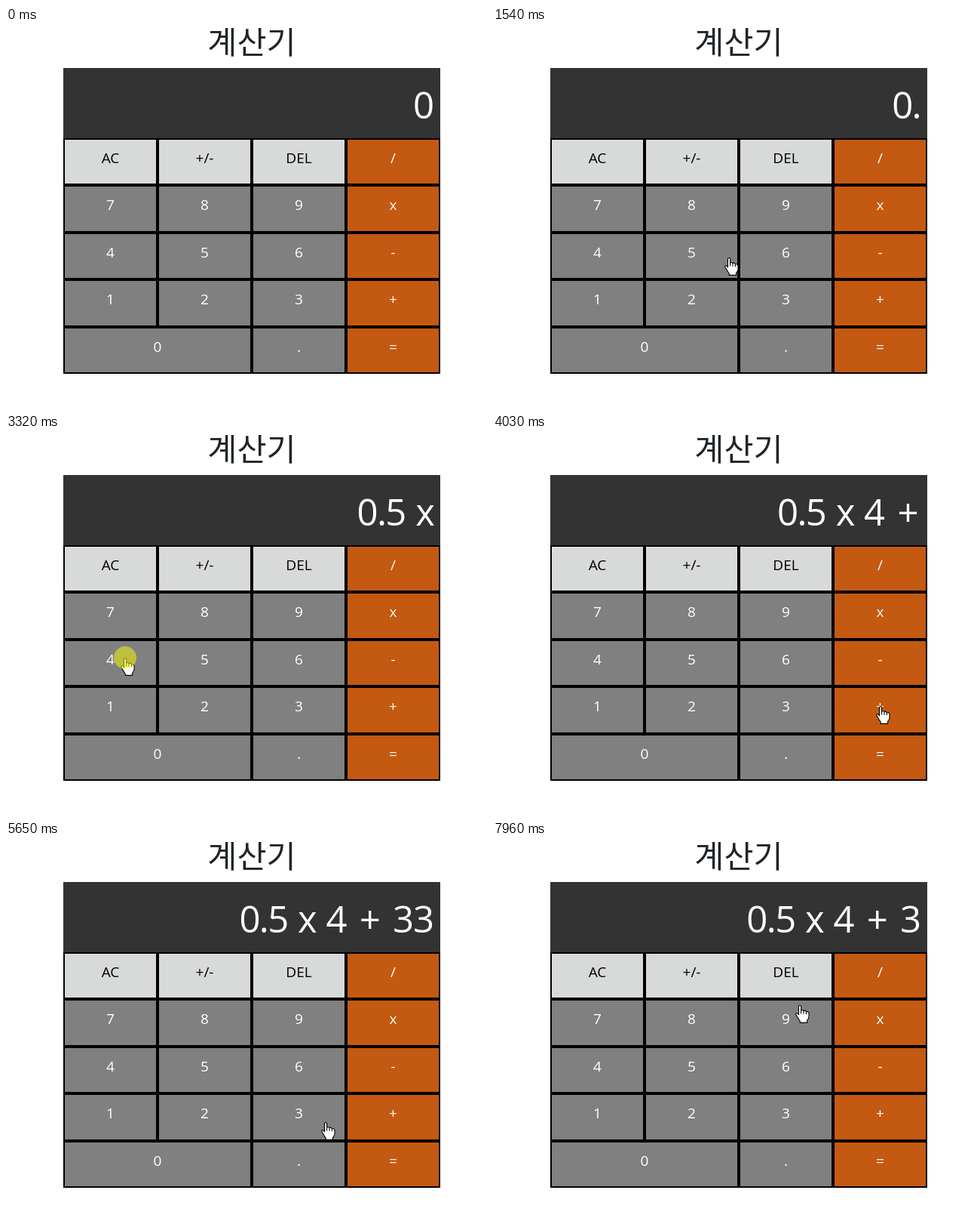
These frames come from a looping animation (638x502 px, 8 s). An HTML page with a canvas:

```html
<!DOCTYPE html>
<html lang="ko">
<head>
<meta charset="utf-8">
<title>계산기</title>
<style>
  html, body { margin: 0; width: 100%; height: 100%; overflow: hidden; background: #fff; }
  canvas { display: block; }
</style>
</head>
<body>
<canvas id="stage" width="638" height="502"></canvas>
<script>
const ctx = document.getElementById('stage').getContext('2d');
const LOOP = 8000, START = 292, TICK = 77.4;
const SANS = '"Open Sans", "Noto Sans", sans-serif';
const HANGUL = '"Noto Sans CJK KR", "Noto Sans CJK JP", "Noto Sans CJK", sans-serif';
const LEFT = 76, TOP = 146, CELL_W = 125, CELL_H = 62.5;

const ROWS = [
  ['AC', '+/-', 'DEL', '/'],
  ['7', '8', '9', 'x'],
  ['4', '5', '6', '-'],
  ['1', '2', '3', '+'],
  ['0', null, '.', '=']
];

// Places the pointer rests at; times in ticks, "via" bends the way there
const STOPS = [
  { at: [546, 482], arrive: 0, leave: 0 },
  { at: [392, 417], arrive: 9, leave: 12, via: [255, 365], key: '.', press: 10 },
  { at: [299, 302], arrive: 17, leave: 19, via: [360, 333], key: '5', press: 17 },
  { at: [494, 243], arrive: 22, leave: 30, key: 'x', press: 25 },
  { at: [158, 295], arrive: 38, leave: 40, via: [290, 345], key: '4', press: 38 },
  { at: [514, 359], arrive: 46, leave: 51, via: [380, 345], key: '+', press: 46 },
  { at: [407, 372], arrive: 57, leave: 60, via: [340, 366], key: '3', press: 59 },
  { at: [412, 376], arrive: 65, leave: 67, key: '3', press: 65 },
  { at: [424, 371], arrive: 69, leave: 72 },
  { at: [422, 190], arrive: 82, leave: 94, via: [511, 290], key: 'DEL', press: 85, hold: 1 },
  { at: [407, 216], arrive: 99, leave: 104, via: [407, 312] }
];
const CLICKS = STOPS.filter(s => s.key).map(({ key, press, hold = 2 }) =>
  ({ key, press, release: press + hold }));

const HAND = new Path2D(
  'M-1.5 1.6Q0-.6 1.6 1.6V7.2Q3.4 5.6 5 7.6Q6.9 6.4 8.4 8.7Q10.6 8 12 10.6' +
  'V15.5Q11.8 18 9.6 20.4V23.4H.2V21Q-2 18.5-3.2 15.8L-5.3 12.6Q-5 9.8-2.8 11.2L-1.5 12.8Z');
const KNUCKLES = new Path2D('M1.6 7V11.5M5 8V11.8M8.4 9V12.2');

function text(str, x, y, font, color) {
  ctx.font = font;
  ctx.fillStyle = color;
  ctx.fillText(str, x, y);
}

function cellColor(row, col) {
  if (col === 3) return '#c45911';
  return row === 0 ? '#d8dad9' : '#808080';
}

function drawKeys() {
  ctx.fillStyle = '#000';
  ctx.fillRect(LEFT, TOP, CELL_W * 4, 312);
  ROWS.forEach((row, r) => row.forEach((label, c) => {
    if (label === null) return;
    const w = label === '0' ? CELL_W * 2 : CELL_W;
    const x = LEFT + c * CELL_W;
    const y = Math.floor(TOP + r * CELL_H);
    const bottom = Math.floor(TOP + (r + 1) * CELL_H);
    const light = r === 0 && c < 3;
    ctx.fillStyle = cellColor(r, c);
    ctx.fillRect(x + 2, y + 2, w - 4, bottom - y - 4);
    text(label, x + w / 2, y + 33, `${light ? 400 : 500} 19px ${SANS}`, light ? '#000' : '#fff');
  }));
}

// What the display shows after one more key
function type(shown, key) {
  if (key === 'DEL') return shown.slice(0, -1);
  const spaced = 'x+'.includes(key) || /[x+]$/.test(shown);
  return shown + (spaced ? ' ' : '') + key;
}

// Character advance in em
function advance(ch) {
  return { '.': 0.217, ' ': 0.274, 'x': 0.459, '+': 0.684 }[ch] || 0.539;
}

function drawDisplay(shown) {
  ctx.fillStyle = '#323332';
  ctx.fillRect(LEFT, 53, CELL_W * 4, 93);
  let x = 567.5;
  for (const ch of [...shown].reverse()) {
    const w = advance(ch) * 50;
    text(ch, x - w / 2, 119.5, `49px ${SANS}`, '#fff');
    x -= w;
  }
}

function pointerAt(tick) {
  const next = STOPS.findIndex(s => s.leave >= tick);
  const to = STOPS[next];
  if (tick >= to.arrive) return to.at;
  const from = STOPS[next - 1];
  const u = (tick - from.leave) / (to.arrive - from.leave);
  const s = (1 - Math.cos(Math.PI * u)) / 2;
  return to.at.map((b, i) => {
    const a = from.at[i], mid = (a + b) / 2;
    const bend = to.via ? to.via[i] - mid : 0;
    return Math.round(a + (b - a) * s + 4 * s * (1 - s) * bend);
  });
}

function drawPointer([x, y], pressed) {
  ctx.save();
  ctx.translate(x, y);
  ctx.fillStyle = '#fff';
  ctx.strokeStyle = '#000';
  ctx.lineWidth = 1.1;
  ctx.lineJoin = 'round';
  ctx.fill(HAND);
  ctx.stroke(HAND);
  ctx.stroke(KNUCKLES);
  if (pressed) {
    ctx.fillStyle = 'rgba(255, 255, 0, 0.5)';
    ctx.beginPath();
    ctx.arc(0, 0, 15, 0, Math.PI * 2);
    ctx.fill();
  }
  ctx.restore();
}

function draw(t) {
  const tick = Math.floor((t - START) / TICK);
  ctx.fillStyle = '#fff';
  ctx.fillRect(0, 0, 638, 502);
  ctx.textAlign = 'center';
  text('계산기', 326, 34, `300 42.5px ${HANGUL}`, '#212529');
  drawDisplay(CLICKS.filter(c => c.release <= tick).reduce((s, c) => type(s, c.key), '0'));
  drawKeys();
  if (tick >= 0) {
    drawPointer(pointerAt(tick), CLICKS.some(c => tick >= c.press && tick < c.release));
  }
}

function frame() {
  draw(performance.now() % LOOP);
  requestAnimationFrame(frame);
}
frame();
</script>
</body>
</html>
```
